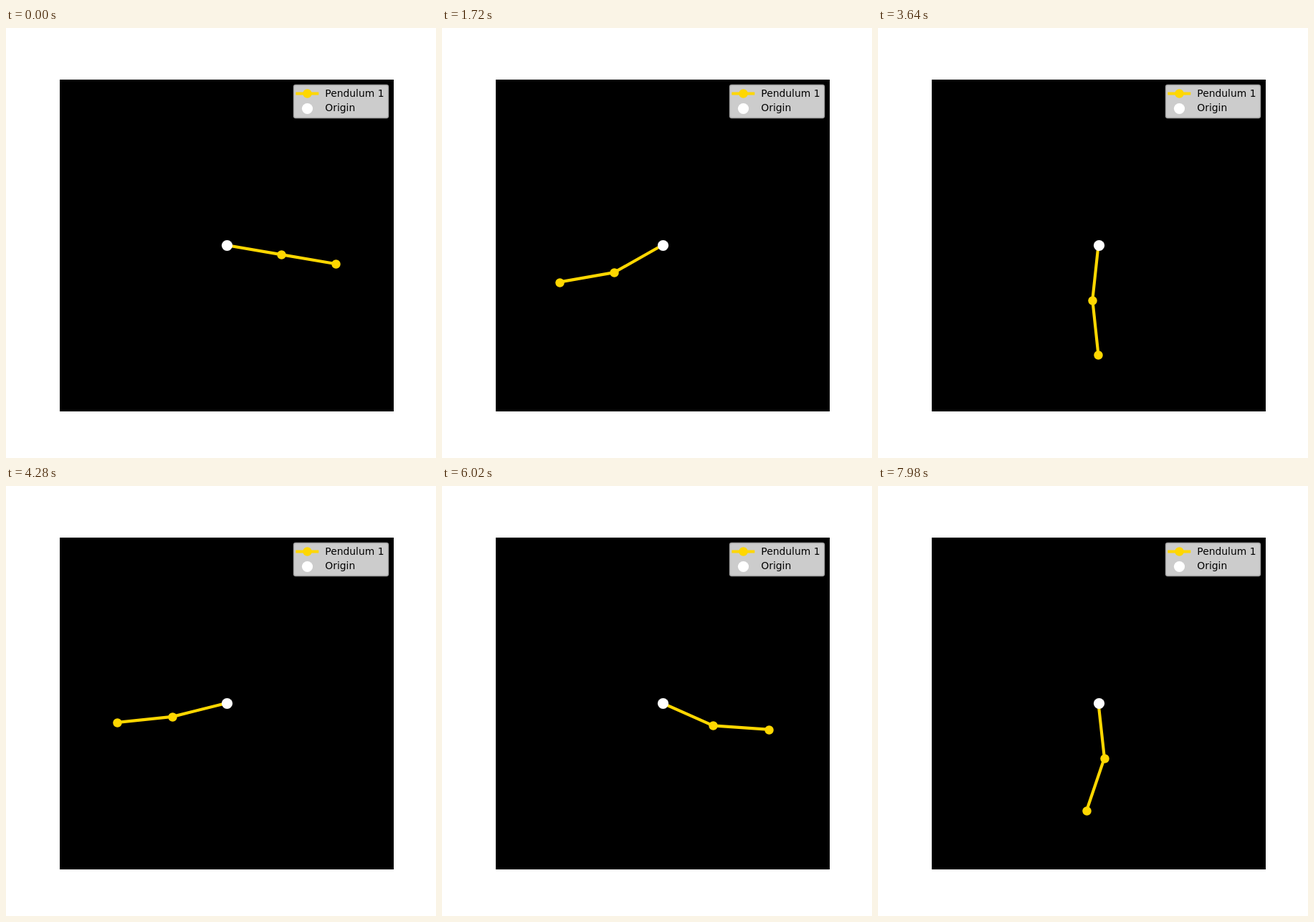
An HTML page that plays this animation: 600x600 px, repeating every 8 s.

```html
<!DOCTYPE html>
<html lang="en">
<head>
<meta charset="utf-8">
<title>Double pendulum</title>
<style>
  html, body { margin: 0; width: 100%; height: 100%; overflow: hidden; background: #fff; }
  svg { display: block; width: 600px; height: 600px; }
  .rod { fill: none; stroke: #ffd700; stroke-width: 4.17; stroke-linecap: square; stroke-linejoin: round; }
  .bob { fill: #ffd700; }
  .origin { fill: #fff; }
  text { font: 13.89px "DejaVu Sans", sans-serif; }
</style>
</head>
<body>
<svg viewBox="0 0 600 600">
  <rect x="75" y="72" width="466" height="463"/>
  <polyline id="rod" class="rod"/>
  <circle id="bob1" class="bob" r="6.25"/>
  <circle id="bob2" class="bob" r="6.25"/>
  <circle class="origin" cx="308.5" cy="303.5" r="7.6"/>
  <rect x="401.5" y="79.5" width="132" height="46" rx="2.8"
        fill="#fff" stroke="#ccc" stroke-width="1.39" opacity=".8"/>
  <path class="rod" d="M406.4 91.5H434.2"/>
  <circle class="bob" cx="420.5" cy="91.5" r="6.25"/>
  <circle class="origin" cx="420.5" cy="112.5" r="7.6"/>
  <text x="445.3" y="96">Pendulum 1</text>
  <text x="445.3" y="116">Origin</text>
</svg>
<script>
const STEP = 20, LOOP = 8000, COUNT = LOOP / STEP;
const PIVOT = [307.5, 303], UNIT = [77.5, 77];

// Known poses: time in ms, then both bob centres
const POSES = [
  [0, 384, 316, 460, 329],
  [960, 272, 371, 208, 415],
  [2420, 338, 374, 408, 408],
  [3640, 299, 380, 308, 456],
  [4960, 286, 377, 240, 439],
  [6020, 378, 334, 456, 340],
  [7980, 316, 380, 291, 452],
];

// Equal masses and unit rods; state is [angle1, angle2, speed1, speed2]
function slope([a1, a2, w1, w2], g) {
  const s = Math.sin(a1 - a2), c = Math.cos(a1 - a2), d = 2 - c * c;
  const f1 = -s * w2 * w2 - 2 * g * Math.sin(a1);
  const f2 = s * w1 * w1 - g * Math.sin(a2);
  return [w1, w2, (f1 - c * f2) / d, (2 * f2 - c * f1) / d];
}

const move = (state, k, h) => state.map((v, i) => v + k[i] * h);

function rungeKutta(state, g, h) {
  const k1 = slope(state, g);
  const k2 = slope(move(state, k1, h / 2), g);
  const k3 = slope(move(state, k2, h / 2), g);
  const k4 = slope(move(state, k3, h), g);
  return state.map((v, i) => v + h / 6 * (k1[i] + 2 * k2[i] + 2 * k3[i] + k4[i]));
}

function toPixels([a1, a2]) {
  const x = PIVOT[0] + UNIT[0] * Math.sin(a1);
  const y = PIVOT[1] + UNIT[1] * Math.cos(a1);
  return [x, y, x + UNIT[0] * Math.sin(a2), y + UNIT[1] * Math.cos(a2)];
}

function simulate(degrees, g) {
  const angle = degrees * Math.PI / 180;
  const path = [];
  let state = [angle, angle, 0, 0];
  for (let i = 0; i < COUNT; i++) {
    path.push(toPixels(state));
    state = rungeKutta(state, g, STEP / 1000);
  }
  return path;
}

function misfit(path) {
  let sum = 0;
  for (const [time, ...spots] of POSES) {
    const at = path[time / STEP];
    spots.forEach((v, i) => { sum += (v - at[i]) ** 2; });
  }
  return sum;
}

// Release angle and gravity that carry the swing closest through the poses
function calibrate() {
  let best = simulate(80, 9.81), least = misfit(best);
  for (let degrees = 79.9; degrees < 80.45; degrees += 0.1) {
    for (let g = 9.51; g < 10.115; g += 0.01) {
      const path = simulate(degrees, g), error = misfit(path);
      if (error < least) [best, least] = [path, error];
    }
  }
  return best;
}

const path = calibrate();
const [rod, bob1, bob2] = ["rod", "bob1", "bob2"].map(id => document.getElementById(id));

function place(bob, x, y) {
  bob.setAttribute("cx", Math.round(x) + 0.5);
  bob.setAttribute("cy", Math.round(y) + 0.5);
}

function draw(time) {
  const [x1, y1, x2, y2] = path[Math.floor((time % LOOP) / STEP + 1e-6) % COUNT];
  rod.setAttribute("points", `${PIVOT} ${x1},${y1} ${x2},${y2}`);
  place(bob1, x1, y1);
  place(bob2, x2, y2);
}

let start;
function tick(now) {
  start ??= now;
  draw(now - start);
  requestAnimationFrame(tick);
}
draw(0);
requestAnimationFrame(tick);
</script>
</body>
</html>
```
